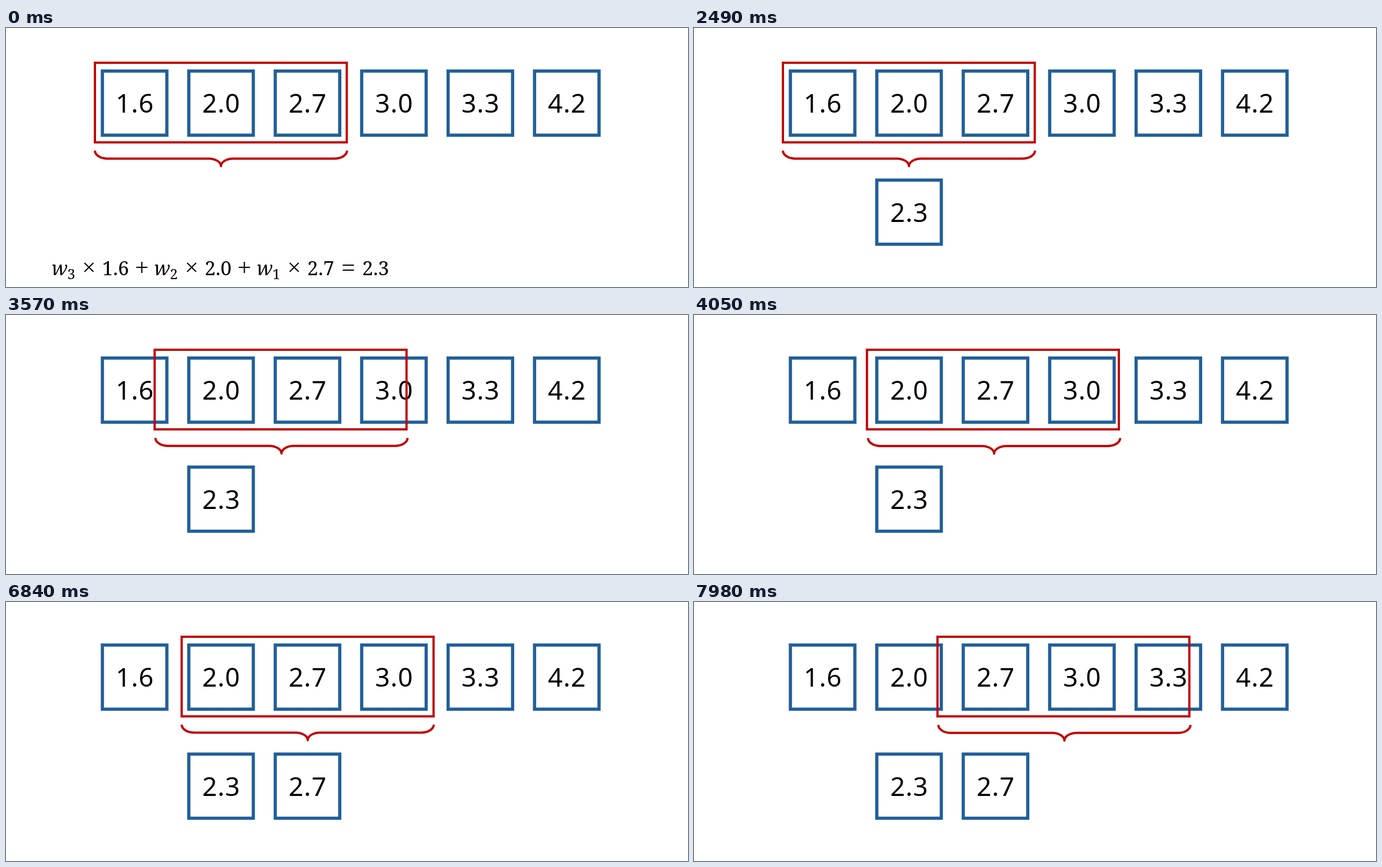
Write an HTML page that moves like this. It is 1212 by 462 pixels and loops after 8000 ms.

```html
<!DOCTYPE html>
<html lang="en">
<head>
<meta charset="utf-8">
<title>Weighted moving average</title>
<style>
  html, body { margin: 0; width: 100%; height: 100%; overflow: hidden; background: #fff; }
  svg { display: block; width: 100%; height: 100%; }
  text { text-anchor: middle; fill: #000; }
  .cell rect { fill: #fff; stroke: #215f9a; stroke-width: 5.7; }
  .cell text { font: 46px "Noto Sans", "Open Sans", sans-serif; letter-spacing: 1px; }
  .red { fill: none; stroke: #c00000; stroke-width: 4; }
  .num { font: 35px "Noto Serif", serif; }
  .var { font: italic 35px "Noto Serif", serif; }
  .sub { font: 25px "Noto Serif", serif; }
  .op { font: 43px "Liberation Serif", serif; }
</style>
</head>
<body>
<svg id="stage" viewBox="0 0 1212 462"></svg>
<script>
const LOOP = 8000, TICK = 60, PITCH = 153.6, FIRST_X = 228.6;
const PHASES = [0, 2490, 6840];
const MOVE_MS = 1700;
const stage = document.getElementById("stage");

function add(parent, tag, attrs = {}, text = "") {
  const el = document.createElementNS("http://www.w3.org/2000/svg", tag);
  for (const key in attrs) el.setAttribute(key, attrs[key]);
  el.textContent = text;
  return parent.appendChild(el);
}

function cell(value, col, cy) {
  const g = add(stage, "g", { class: "cell" });
  const cx = FIRST_X + col * PITCH;
  add(g, "rect", { x: cx - 57.3, y: cy - 57.2, width: 114.6, height: 114.4 });
  add(g, "text", { x: cx + 0.5, y: cy + 17 }, value);
  return g;
}

function formula(values, result, dx) {
  const g = add(stage, "g", { transform: `translate(${dx} 0)` });
  const put = (cls, x, text, y = 441) => add(g, "text", { class: cls, x, y }, text);
  values.forEach((value, i) => {
    const x = i * 182.3;
    put("var", 95 + x, "w");
    put("sub", 116 + x, 3 - i, 448);
    put("op", 147.5 + x, "×");
    put("num", 194.7 + x, value);
    if (i < 2) put("op", 241.3 + x, "+");
  });
  put("op", 608.3, "=");
  put("num", 657, result);
  return g;
}

["1.6", "2.0", "2.7", "3.0", "3.3", "4.2"].forEach((v, i) => cell(v, i, 134));
const result1 = cell("2.3", 1, 328.5);
const result2 = cell("2.7", 2, 328.5);
const formula1 = formula(["1.6", "2.0", "2.7"], "2.3", 0);
const formula2 = formula(["2.0", "2.7", "3.0"], "2.7", 154);

const frame = add(stage, "rect", { class: "red", x: 158, y: 62, width: 447.6, height: 142 });
const brace = add(stage, "path", {
  class: "red", "stroke-linejoin": "round",
  d: "M158 218.7A22 14.2 0 0 0 180 232.9H360A22 13.6 0 0 1 382 246.5" +
     "A22 13.6 0 0 1 404 232.9H584A22 14.2 0 0 0 606 218.7"
});

const clamp = v => Math.min(1, Math.max(0, v));
const ease = u => u < 0.5 ? 2 * u * u : 1 - 2 * (1 - u) ** 2;
const fade = (t, start) => clamp((t - start) / 480);
const show = (el, on) => el.setAttribute("visibility", on ? "visible" : "hidden");
const move = (el, x, y) => el.setAttribute("transform", `translate(${x} ${y})`);

function draw(time) {
  const phase = PHASES.filter(p => p <= time).pop();
  const t = phase + Math.floor((time - phase) / TICK) * TICK;

  result1.setAttribute("opacity", fade(t, 0));
  result2.setAttribute("opacity", fade(t, 4290));
  show(formula1, t < 2490);
  show(formula2, t >= 4290 && t < 6840);

  // The brace travels slightly further than the frame, then both snap into line.
  const second = t >= 6840;
  const p = ease(clamp((t - (second ? 6834 : 2535)) / MOVE_MS));
  const home = second ? 154.2 : 0;
  move(frame, home + 153 * p, 0);
  move(brace, home + 155 * p, 0.8 * p);
}

let start;
function tick(now) {
  start ??= now;
  draw((now - start) % LOOP);
  requestAnimationFrame(tick);
}
draw(0);
requestAnimationFrame(tick);
</script>
</body>
</html>
```
